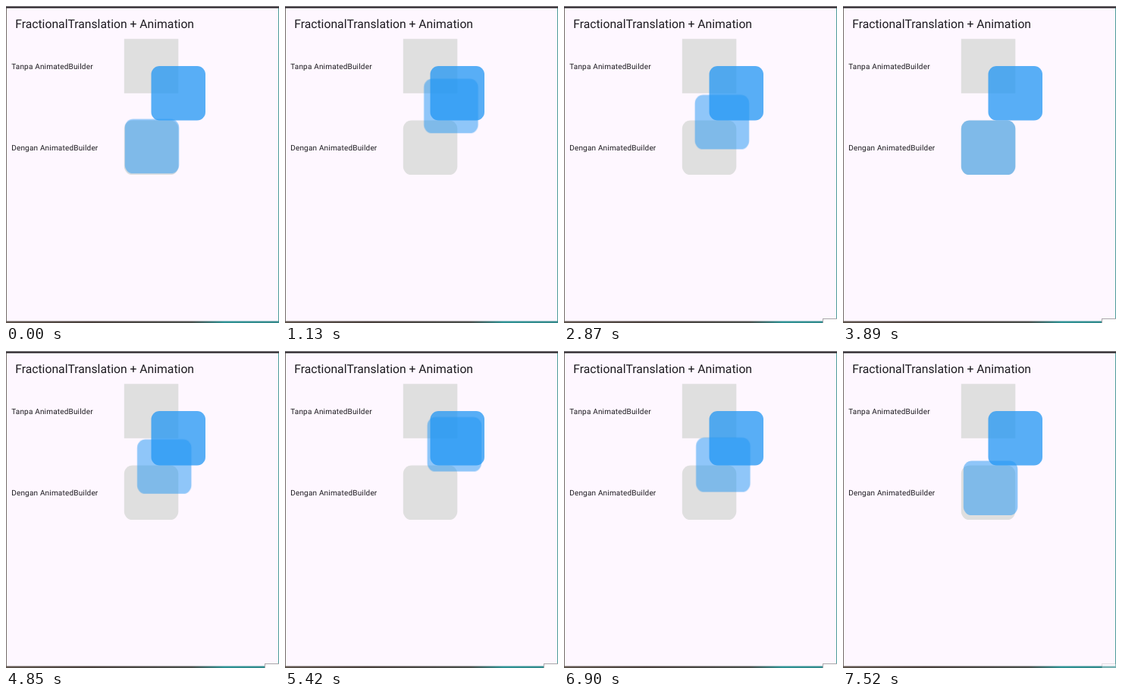
An HTML page for the animation above (7590 ms loop, 360 by 417 pixels).

```html
<!DOCTYPE html>
<html lang="id">
<head>
<meta charset="utf-8">
<title>FractionalTranslation + Animation</title>
<style>
  html, body { margin: 0; width: 100%; height: 100%; overflow: hidden; background: #fef7ff; }
  svg { display: block; width: 360px; height: 417px; }
  text { font-family: Roboto, sans-serif; fill: #1d1b20; text-rendering: geometricPrecision; }
  .title { font-size: 15.73px; }
  .label { font-size: 10px; letter-spacing: .18px; }
  .slot { fill: #dfdfdf; }
  .blue { fill: #2196f3; }
  #mover { animation: drift 2040ms ease-in-out infinite alternate paused; }
  @keyframes drift {
    from { transform: translate(0, 0); }
    to { transform: translate(35.75px, -71.5px); }
  }
</style>
</head>
<body>
<svg viewBox="0 0 360 417">
  <defs>
    <linearGradient id="desk">
      <stop offset="0" stop-color="#5f554e"/>
      <stop offset=".3" stop-color="#4a413d"/>
      <stop offset=".68" stop-color="#4b4f4c"/>
      <stop offset=".8" stop-color="#2f9294"/>
      <stop offset="1" stop-color="#35898b"/>
    </linearGradient>
  </defs>

  <!-- window and its edges -->
  <rect width="360" height="417" fill="#fef7ff"/>
  <rect width="1" height="417" fill="#756d6a"/>
  <rect x="359" width="1" height="417" fill="#4f9c9c"/>
  <rect width="360" height="1" fill="#7d797d"/>
  <rect y="1" width="360" height="2" fill="#423e42"/>
  <rect y="414.5" width="360" height="2.5" fill="url(#desk)"/>

  <text class="title" x="12.2" y="28.6">FractionalTranslation + Animation</text>
  <text class="label" x="7.2" y="83">Tanpa AnimatedBuilder</text>
  <text class="label" x="7.2" y="190.3">Dengan AnimatedBuilder</text>

  <rect class="slot" x="155.8" y="43.3" width="71.5" height="71.5"/>
  <rect class="slot" x="155.8" y="150.6" width="71.5" height="71.5" rx="11"/>
  <rect class="blue" x="191.5" y="79.05" width="71.5" height="71.5" rx="11" opacity=".75"/>
  <rect id="mover" class="blue" x="155.8" y="150.6" width="71.5" height="71.5" rx="11" opacity=".5"/>

  <rect id="corner" x="341.5" y="411.5" width="20" height="8" fill="#fff" stroke="#a9a5a9"/>
</svg>
<script>
  const LOOP = 7590, PHASE = 225;
  const CORNER_ON = 1400, CORNER_FADE = 7380;
  const corner = document.getElementById('corner');
  const drift = document.getElementById('mover').getAnimations()[0];

  function draw() {
    const t = performance.now() % LOOP;
    drift.currentTime = t + PHASE;
    corner.setAttribute('opacity', t < CORNER_ON ? 0 : t < CORNER_FADE ? 1 : .35);
    requestAnimationFrame(draw);
  }
  draw();
</script>
</body>
</html>
```
